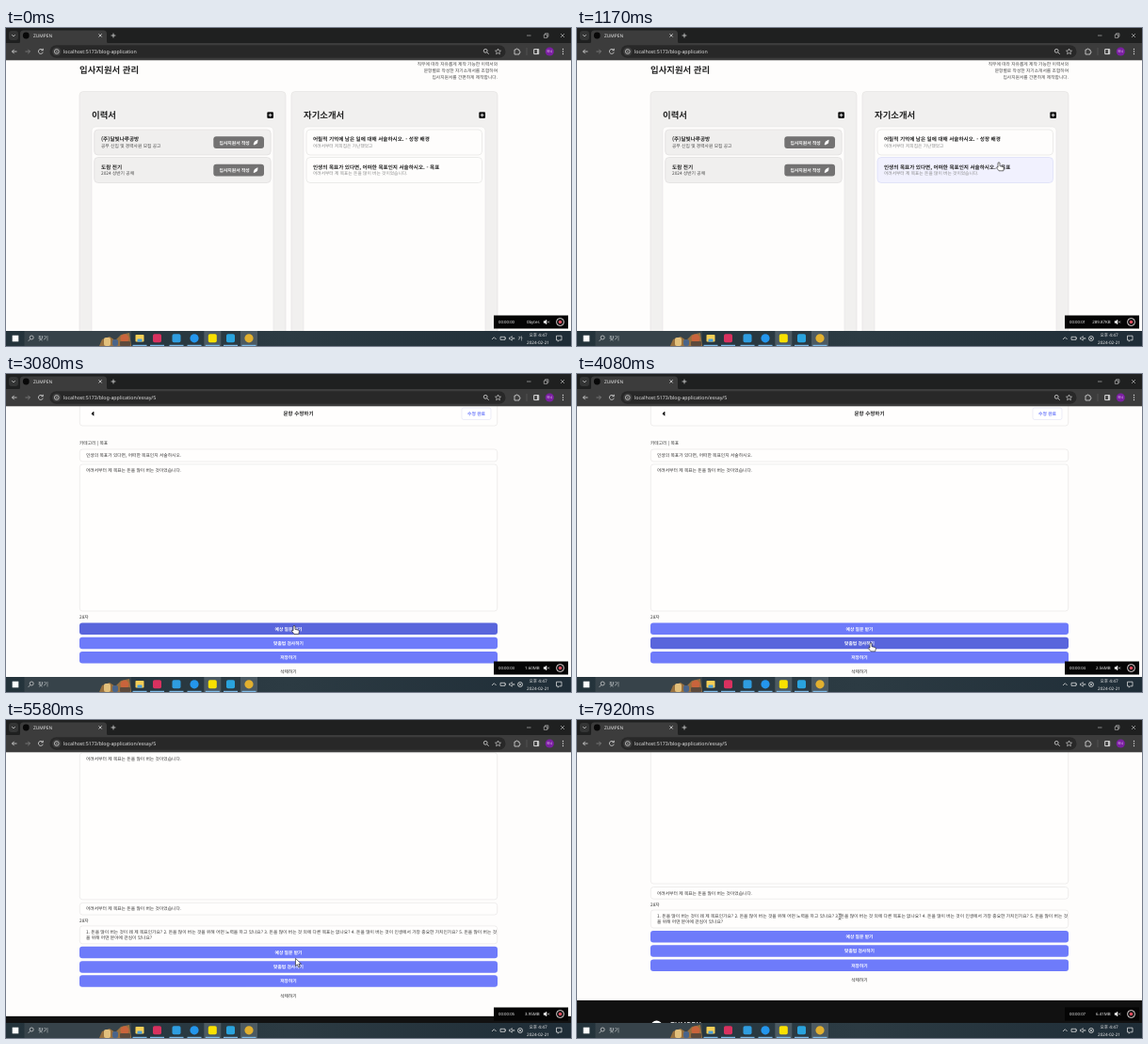
These frames come from a looping animation (600 by 338 pixels, 8000 ms). An HTML page:

```html
<!DOCTYPE html>
<html lang="ko">
<head>
<meta charset="utf-8">
<style>
html, body { margin: 0; width: 100%; height: 100%; overflow: hidden; background: #fefdfc; }
svg { display: block; width: 600px; height: 338px; text-rendering: geometricPrecision; white-space: pre;
  font-family: 'Noto Sans CJK KR', 'Noto Sans CJK', sans-serif; }
.ui { font-family: 'Noto Sans', 'Noto Sans CJK KR', 'Noto Sans CJK', sans-serif; }
</style>
</head>
<body>
<svg id="stage" viewBox="0 0 600 338"></svg>
<script>
const LOOP = 8000, FPS = 12;
const INK = '#222', LINE = '#e4e3e3', BLUE = '#6e7bfa', BLUE_HOVER = '#5965dc';

const rect = (x, y, w, h, r, fill, stroke = 'none', attrs = '') =>
  `<rect x="${x}" y="${y}" width="${w}" height="${h}" rx="${r}" fill="${fill}" stroke="${stroke}" stroke-width=".6" ${attrs}/>`;
const circle = (x, y, r, fill, stroke = 'none', width = .8) =>
  `<circle cx="${x}" cy="${y}" r="${r}" fill="${fill}" stroke="${stroke}" stroke-width="${width}"/>`;
const text = (x, y, size, str, fill = INK, weight = 400, anchor = 'start', attrs = '') =>
  `<text x="${x}" y="${y}" font-size="${size}" fill="${fill}" font-weight="${weight}" text-anchor="${anchor}" ${attrs}>${str}</text>`;
const path = (d, stroke = '#ddd', width = .8, fill = 'none') =>
  `<path d="${d}" stroke="${stroke}" stroke-width="${width}" fill="${fill}" stroke-linejoin="round"/>`;
const group = (id, content, attrs = '') => `<g id="${id}" ${attrs}>${content}</g>`;

const GOAL = '어려서부터 제 목표는 돈을 많이 버는 것이었습니다.';
const PROMPT = '인생의 목표가 있다면, 어떠한 목표인지 서술하시오.';

function recorder(x, y) {
  return rect(x, y, 79, 14, 0, '#050505') +
    text(x + 5, y + 8.7, 4.3, '', '#eee', 400, 'start', 'class="ui timer"') +
    text(x + 48.5, y + 8.7, 4.4, '', '#eee', 400, 'end', 'class="ui bytes"') +
    path(`M${x + 53} ${y + 6}h1.3l1.7 -1.5v5l-1.7 -1.5h-1.3z`, '#eee', .4, '#eee') +
    path(`M${x + 57} ${y + 6}l2 2m0 -2l-2 2`, '#eee', .6) +
    circle(x + 70.5, y + 7, 4, '#151515', '#f0e6e6', .9) +
    rect(x + 68.9, y + 5.4, 3.2, 3.2, .4, '#d8485a');
}

function listPage() {
  const panel = (x, title) =>
    rect(x, 67.5, 219, 270, 4, '#f1f0ef', '#e2e1e0') +
    text(x + 13, 96.2, 9.4, title, INK, 700) +
    rect(x + 199.3, 89.3, 6.7, 6.7, 1.2, '#111') +
    path(`M${x + 202.65} 90.8v3.7m-1.85 -1.85h3.7`, '#fff', .8) +
    rect(x + 13, 105, 193, 240, 4, '#fefdfc', '#e6e5e4');
  const resume = (y, name, sub) =>
    rect(93.7, y, 187.5, 27, 4, '#f0efee', '#dcdbda') +
    text(101, y + 12.4, 5.6, name, INK, 700) +
    text(101, y + 18.7, 4.75, sub, '#444') +
    rect(220.3, y + 7.3, 53.7, 12.7, 3, '#737272') +
    text(226.5, y + 15.5, 4.8, '입사지원서 작성', '#fff', 700) +
    path(`M263 ${y + 16}l1.2 -3.2l3 -1.6l-.6 3.2l-2.4 1.4z`, '#fff', .7, '#fff');
  const essay = (y, name, sub, id) =>
    rect(319, y, 186.5, 27, 4, '#fefdfc', '#e0dfde', `id="${id}"`) +
    text(326, y + 12.4, 5.57, name, INK, 700) +
    text(326, y + 18.7, 4.73, sub, '#8a8a8a');
  return text(78, 48.4, 9.4, '입사지원서 관리', INK, 700) +
    ['직무에 따라 자유롭게 제작 가능한 이력서와', '문항별로 작성한 자기소개서를 조합하여', '입사지원서를 간편하게 제작합니다.']
      .map((s, i) => text(522, 40.2 + i * 6.7, 4.75, s, '#444', 400, 'end')).join('') +
    panel(78, '이력서') + panel(303, '자기소개서') +
    resume(108, '(주)달빛나루공방', '공무 신입 및 경력사원 모집 공고') +
    resume(137.5, '도람 전기', '2024 상반기 공채') +
    essay(108, '어릴적 기억에 남은 일에 대해 서술하시오. - 성장 배경', '어려서부터 저희집은 가난했었고', 'cardA') +
    essay(137.5, '인생의 목표가 있다면, 어떠한 목표인지 서술하시오. - 목표', GOAL, 'cardB');
}

function essayPage() {
  const box = (y, h, ...lines) => rect(78.3, y, 443.4, h, 3, '#fffefd', LINE) +
    lines.map((s, i) => text(85, y + 8 + i * 6.2, 4.76, s, '#333')).join('');
  const button = (y, label, id) => rect(78, y, 444, 12.5, 3, BLUE, 'none', `id="${id}"`) +
    text(300, y + 8, 4.75, label, '#fff', 700, 'middle');
  const names = ['DANBIRON', 'MORETTIL', 'LUMASTO', 'PERRUNO', 'VELUNGOI', 'KIRUMA'];
  return rect(78.3, 20, 443.4, 35, 3, '#fffefd', LINE) +
    path('M93 40.2v4l-2 -2z', '#111', .8, '#111') +
    text(310.5, 44.4, 5.5, '문항 수정하기', INK, 700, 'middle') +
    rect(484, 36, 31, 12.5, 2, '#fff', '#dfe0f3') +
    text(499.5, 44, 4.8, '수정 완료', BLUE, 700, 'middle') +
    text(78, 75.3, 4.75, '카테고리 | 목표', '#333') +
    box(80, 13, PROMPT) + box(96, 156, GOAL) +
    group('count', text(78, 260, 4.75, '28자', '#333')) +
    group('results', box(255.5, 12.7, GOAL) +
      box(280, 19,
        '1. 돈을 많이 버는 것이 왜 제 목표인가요? 2. 돈을 많이 버는 것을 위해 어떤 노력을 하고 있나요? 3. 돈을 많이 버는 것 외에 다른 목표는 없나요? 4. 돈을 많이 버는 것이 인생에서 가장 중요한 가치인가요? 5. 돈을 많이 버는 것',
        '을 위해 어떤 분야에 관심이 있나요?')) +
    group('tail',
      button(264.5, '예상 질문 받기', 'ask') + button(279.8, '맞춤법 검사하기', 'spell') +
      button(295, '저장하기', 'save') +
      text(300, 318.4, 4.75, '삭제하기', INK, 500, 'middle') +
      rect(0, 338.5, 600, 80, 0, '#111') + circle(84.5, 366, 6, '#fff') +
      text(99, 367.5, 7.8, 'ZUMPEN', '#fff', 700) +
      names.map((n, i) => text(270 + i * 47, 366.5, 5, n, '#fff', 700)).join(''));
}

function browserBar() {
  return rect(0, 0, 600, 17, 0, '#1f2020') +
    rect(3, 3, 10, 10, 3, '#343535') + path('M6.3 7.2l1.7 1.7l1.7 -1.7') +
    path('M12 17q3 0 3 -3v-8q0 -3.5 3.5 -3.5h85q3.5 0 3.5 3.5v8q0 3 3 3z', 'none', 0, '#3c3c3c') +
    circle(21.3, 8, 3.4, '#080808') +
    text(29, 10, 4.9, 'ZUMPEN', '#e6e6e6', 400, 'start', 'class="ui"') +
    path('M98.5 6.3l3.2 3.2m0 -3.2l-3.2 3.2M114 5.6v4.8m-2.4 -2.4h4.8') +
    path('M553 8h4.5M571.3 7h3.4v3.4h-3.4zM572.5 7v-1.2h3.4v3.4h-1.2M589 6l4 4m0 -4l-4 4', '#ccc', .6) +
    rect(0, 16, 600, 18.3, 0, '#3c3c3c') +
    rect(46.5, 18.2, 484, 13.6, 6.8, '#282828') +
    path('M11.5 25h-5m2.2 -2.2l-2.2 2.2l2.2 2.2') +
    path('M20.5 25h5m-2.2 -2.2l2.2 2.2l-2.2 2.2', '#858585') +
    path('M39 23.5a2.5 2.5 0 1 0 .3 2.2M39.3 21.8v2h-2') +
    circle(53.8, 25, 4.6, '#3e3e3e') + circle(53.8, 25, 2.4, 'none', '#ddd', .7) + path('M53.8 24.7v1.5m0 -2.6v.6', '#ddd', .6) +
    text(61, 26.9, 5.28, '', '#e3e3e3', 400, 'start', 'id="address" class="ui"') +
    circle(509.2, 24.3, 1.9, 'none', '#ddd') + path('M510.7 25.8l2 2') +
    path('M522.5 22l.9 2l2.1 .2l-1.6 1.4l.5 2.1l-1.9 -1.1l-1.9 1.1l.5 -2.1l-1.6 -1.4l2.1 -.2z', '#ddd', .6) +
    path('M540 23h1.5a1 1 0 0 1 2 0h1.5v1.6a1 1 0 0 1 0 2v1.4h-5z') +
    path('M553 21v8', '#666', .5) + path('M560.7 22.6h5v5h-5zM564.4 22.6v5', '#ddd', 1) +
    circle(577.3, 25, 4.6, '#7b1fa2') + text(577.3, 26.3, 3.4, '하늬', '#f3ddf8', 400, 'middle') +
    [22.5, 25, 27.5].map(y => circle(591.5, y, .65, '#ddd')).join('');
}

function taskbar() {
  const app = (x, shape, active) => (active ? rect(x - 9, 322, 18, 16, 0, '#4c5a62') : '') +
    shape + rect(x - 7.5, 336.8, 15, 1.2, 0, '#7fbbe8');
  const square = (x, fill) => rect(x - 4.5, 325.3, 9, 9, 1.8, fill);
  return rect(0, 322, 600, 16, 0, 'url(#bar)') + rect(6.7, 326.7, 6.6, 6.6, 0, '#fff') +
    rect(19.5, 322, 113.5, 16, 0, '#37434a') +
    circle(27.2, 329, 2, 'none', '#ddd', .7) + path('M25.7 330.6l-2 2.2', '#ddd', .7) +
    text(34, 332.2, 6, '찾기', '#d5d9db') +
    path('M99 338l3 -7l8 -3l6 4l6 -6l9 -2l2 14z', 'none', 0, '#97703f') +
    rect(104, 329, 7, 9, 2, '#e2c07c') + rect(113, 331, 6, 7, 2, '#49648a') +
    circle(126, 330, 4.5, '#c9643c') + rect(121, 333, 11, 5, 1, '#5d4a3c') +
    app(142, rect(137.5, 326, 9, 7.5, .8, '#f6cf57') + rect(139.5, 330.5, 5, 3, .5, '#4aa0dc')) +
    app(160.5, square(160.5, '#d9315f')) + app(181, square(181, '#2f9de0')) +
    app(200, circle(200, 329.8, 4.6, '#2496ed')) + app(219.3, square(219.3, '#fae100'), true) +
    app(238.5, square(238.5, '#2aa3dd')) + app(258, circle(258, 329.8, 4.6, '#e2b02f'), true) +
    path('M516 331l2.3 -2.3l2.3 2.3', '#eee', .7) +
    path('M525 328.3h5v3h-5zM530.5 329.2v1.2', '#eee', .7) +
    path('M534.5 329h1.2l1.6 -1.4v4.6l-1.6 -1.4h-1.2zM538.3 329l1.8 1.8m0 -1.8l-1.8 1.8', '#eee', .6) +
    text(546, 332.1, 5.6, '가', '#eee', 400, 'middle', 'id="imeKorean"') +
    group('imeOff', circle(546, 330, 2.5, 'none', '#eee', .7) + path('M544.5 328.5l3 3m0 -3l-3 3', '#eee', .6)) +
    text(565, 328.4, 4.7, '오후 4:47', '#eee', 400, 'middle', 'class="ui"') +
    text(565, 335.7, 4.6, '2024-02-21', '#eee', 400, 'middle', 'class="ui"') +
    path('M584.5 327.2h5.5v4.6h-2.5l-1.3 1.4v-1.4h-1.7z', '#eee', .7);
}

function previews() {
  const title = (x, s) => rect(x, 267.5, 6.6, 6.6, 1.4, '#fae100') + text(x + 10, 272.9, 5.3, s, '#eee');
  let rows = '';
  for (let i = 0; i < 7; i++) {
    const y = 283 + i * 5;
    rows += rect(150, y, 3, 3, 1, ['#8db3d9', '#d6a18f', '#5f6f86'][i % 3]) +
      rect(154.5, y + .4, 8 + i % 3 * 2, .8, 0, '#777') + rect(154.5, y + 2, 6, .6, 0, '#bbb') +
      rect(186 + i % 2 * 7, y - 1, 14, 3.2, 1, i % 3 ? '#f3f4f6' : '#eadf75');
  }
  return rect(137.5, 265, 163.5, 57.5, 0, '#49494b') +
    title(140.5, '보라수다') + title(180.3, '두레 공통') + title(219.5, '화면녹화') +
    rect(144, 277, 26, 42, 0, '#fff') + rect(144, 277, 4.5, 42, 0, '#e6e6e8') +
    text(150, 281.4, 2.8, '친구 목록', '#444') +
    rect(184, 277, 26, 42, 0, '#b6c7d9') + rect(184, 277, 26, 4, 0, '#d8e1ea') +
    rect(184, 313, 26, 6, 0, '#fff') + rows + recorder(220, 291);
}

const arrow = path('M0 0v8.2l1.9 -1.8l1.4 3l1.4 -.6l-1.3 -3h2.6z', '#111', .6, '#fff');
const hand = path('M-1 .3q1 -1 2 0v3.4l3.4 .8q1 .3 .9 1.4l-.5 2.9h-4.8l-2.7 -3.4q.4 -1.2 1.7 -.2z', '#111', .6, '#fff');
const beam = path('M-1.4 -3q1.4 0 1.4 .8q0 -.8 1.4 -.8M0 -2.4v4.8M-1.4 3q1.4 0 1.4 -.8q0 .8 1.4 .8', '#222', .6);

const stage = document.getElementById('stage');
stage.innerHTML = `<defs><clipPath id="view"><rect y="34" width="600" height="288"/></clipPath>
  <linearGradient id="bar"><stop stop-color="#24333b"/><stop offset=".5" stop-color="#2c3b43"/><stop offset="1" stop-color="#1f2d37"/></linearGradient></defs>` +
  rect(0, 0, 600, 338, 0, '#fefdfc') +
  `<g clip-path="url(#view)">${group('list', listPage())}${group('essay', essayPage())}</g>` +
  browserBar() + taskbar() + group('previews', previews()) + recorder(518, 305.5) +
  group('cursor', group('arrow', arrow) + group('hand', hand) + group('beam', beam));

const $ = id => document.getElementById(id);
const show = (id, on) => $(id).style.display = on ? '' : 'none';
const move = (id, x, y) => $(id).setAttribute('transform', `translate(${x} ${y})`);
const clamp = v => Math.min(1, Math.max(0, v));
const smooth = v => (v = clamp(v), v * v * (3 - 2 * v));

// Rows start with a time in ms, followed by the values to interpolate.
function along(rows, t, ease) {
  const i = Math.max(1, rows.findIndex(r => r[0] > t));
  const [a, b] = t >= rows.at(-1)[0] ? [rows.at(-1), rows.at(-1)] : [rows[i - 1], rows[i]];
  const k = a === b ? 0 : ease((t - a[0]) / (b[0] - a[0]));
  return a.slice(1).map((v, j) => v + (b[j + 1] - v) * k);
}

const POINTER = [[0, 588, 312], [200, 588, 312], [780, 448, 143], [1350, 448, 143], [1850, 280, 169],
  [2200, 280, 169], [2650, 306, 267], [3350, 306, 268], [3750, 312, 286], [4250, 312, 286], [4700, 312, 278],
  [5400, 312, 278], [5830, 300, 213], [6170, 300, 213], [6670, 125, 210], [6850, 94, 209], [7500, 146, 209], [7910, 279, 209]];
const KILOBYTES = [[0, 0], [200, 0], [830, 196.11], [1920, 505.81], [4080, 2621.44], [5080, 3532.8], [6170, 4648.96], [7920, 6574.08]];

function sizeLabel(kb) {
  if (!kb) return '0bytes';
  return kb < 1024 ? kb.toFixed(2) + 'KB' : (kb / 1024).toFixed(2) + 'MB';
}

function draw(t) {
  const onList = t < 1250, answered = t >= 4500;
  const [x, y] = along(POINTER, t, smooth);
  const over = (top, height) => y >= top && y < top + height;
  const inCards = onList && x > 319 && x < 505;
  const hover = {
    cardA: inCards && over(108, 27), cardB: inCards && over(137.5, 27),
    ask: !onList && !answered && over(264.5, 12.5), spell: !onList && !answered && over(279.8, 12.5)
  };

  show('list', onList);
  show('essay', !onList);
  for (const id of ['cardA', 'cardB']) {
    $(id).setAttribute('fill', hover[id] ? '#f1f1fe' : '#fefdfc');
    $(id).setAttribute('stroke', hover[id] ? '#d6d8f6' : '#e0dfde');
  }
  for (const id of ['ask', 'spell']) $(id).setAttribute('fill', hover[id] ? BLUE_HOVER : BLUE);

  show('results', answered);
  move('count', 0, answered ? 16 : 0);
  move('tail', 0, answered ? 37.5 : 0);
  move('essay', 0, -78 * smooth((t - 5230) / 500));

  $('address').textContent = 'localhost:5173/blog-application' + (onList ? '' : '/essay/5');
  show('imeKorean', t < 400);
  show('imeOff', t >= 400);
  $('previews').style.opacity = t < 1100 ? clamp((t - 300) / 200) : 0;

  const timer = '00:00:0' + Math.floor(t / 1000), bytes = sizeLabel(along(KILOBYTES, t, v => v)[0]);
  document.querySelectorAll('.timer').forEach(e => e.textContent = timer);
  document.querySelectorAll('.bytes').forEach(e => e.textContent = bytes);

  const kind = Object.values(hover).some(Boolean) ? 'hand'
    : (!onList && t < 2650 && over(96, 156)) || t > 6250 ? 'beam' : 'arrow';
  for (const id of ['arrow', 'hand', 'beam']) show(id, id === kind);
  show('cursor', t > 200);
  move('cursor', x, y);
}

function tick() {
  const t = performance.now() % LOOP;
  // Frames begin on 10 ms ticks, just before each twelfth of a second.
  draw(Math.floor(Math.floor((t + 7) * FPS / 1000) * 100 / FPS) * 10 % LOOP);
  requestAnimationFrame(tick);
}
tick();
</script>
</body>
</html>
```
